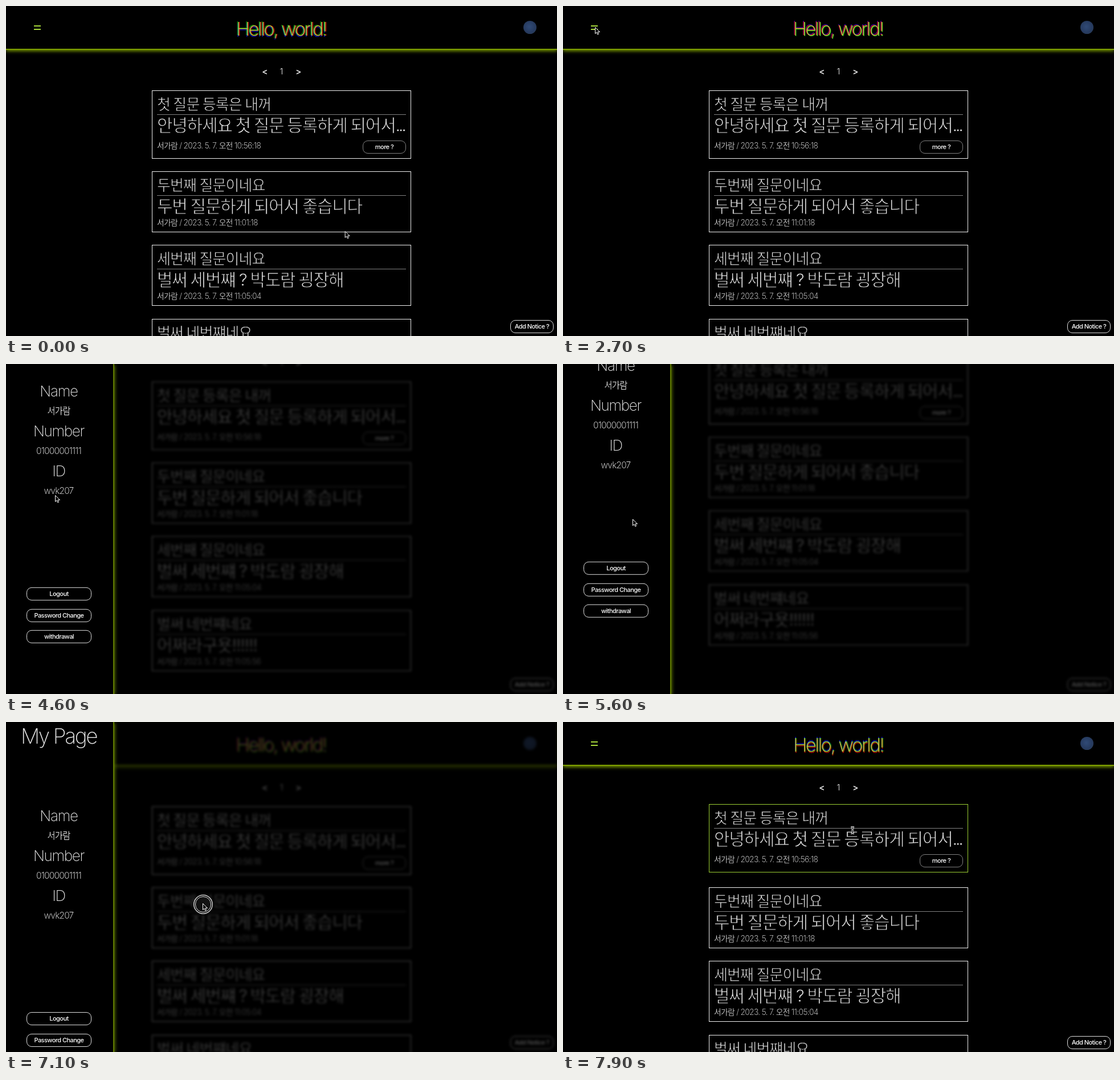
An HTML page for the animation above (8 s loop, 967x579 px).

```html
<!DOCTYPE html>
<html lang="ko">
<head>
<meta charset="utf-8">
<title>Hello, world!</title>
<style>
  :root { --lime: #9acd32; --line: #7d9e00; --loop: 8s linear infinite; }
  * { box-sizing: border-box; }
  html, body { margin: 0; width: 100%; height: 100%; overflow: hidden; background: #000; }
  body {
    position: relative; color: #e4e4e4; white-space: nowrap;
    font: 300 13.8px Inter, 'Noto Sans CJK KR', 'Noto Sans CJK', sans-serif;
  }
  body * { position: absolute; letter-spacing: -.05em; }
  span span { position: static; }

  /* Page */
  .page { inset: 0; animation: dim var(--loop); }
  .scroll { inset: 0; animation: scroll var(--loop); }
  header { left: 0; top: 0; width: 967px; height: 77px; border-bottom: 2px solid var(--line); box-shadow: 0 2px 6px var(--line); }
  h1 {
    margin: 0; left: 0; width: 966px; top: 20px; text-align: center; color: #b4d94c;
    font-size: 32.5px; font-weight: 200; line-height: 41px; letter-spacing: -.066em;
    animation: glitch .5s linear -25ms infinite;
  }
  .menu { left: 49px; top: 34px; width: 12px; height: 8px; border: solid #a5d63a; border-width: 2px 0; }
  .avatar { left: 908px; top: 26px; width: 23px; height: 23px; border-radius: 50%; background: radial-gradient(circle at 45% 45%, #304a76, #263a5e 60%, #34435a); }
  .pager span { top: 105px; width: 20px; text-align: center; line-height: 20px; font-size: 15px; }
  .pager .arrow { font-weight: 600; }

  .card { left: 256px; width: 455px; height: 107px; border: 1px solid #eee; }
  .card.tall { height: 120px; }
  .card span { left: 8px; }
  .title, .text { font-weight: 400; -webkit-text-stroke: .028em #000; word-spacing: -.04em; }
  .title { top: 8px; font-size: 26px; line-height: 32px; letter-spacing: -.035em; }
  .text { top: 41px; font-size: 30px; line-height: 38px; letter-spacing: -.043em; }
  .dots { letter-spacing: -.11em; }
  .date { top: 79px; line-height: 20px; -webkit-text-stroke: .015em #000; }
  .tall .date { top: 86px; }
  .card hr { margin: 0; left: 8px; top: 41px; width: 437px; height: 1px; border: 0; background: #808080; }

  .btn {
    height: 23px; border: 1px solid #ddd; border-radius: 9px; background: #000; color: #fff;
    font-size: 11px; font-weight: 500; line-height: 21px; text-align: center;
  }
  .card .more { left: 369px; top: 87px; width: 76px; border-color: #808080; }
  .notice { left: 885px; top: 551px; width: 76px; }
  .first { animation: first var(--loop); }
  .second { animation: second var(--loop); }

  /* Sidebar */
  aside {
    left: 0; top: 0; width: 190px; height: 579px; overflow: hidden; background: #000;
    border-right: 2px solid #5f7a00; box-shadow: 1px 2px 6px #5f7a00;
    animation: slide var(--loop);
  }
  aside span { left: 0; width: 185px; text-align: center; line-height: 40px; font-size: 15.4px; -webkit-text-stroke: .012em #000; }
  aside .big, aside .label { font-weight: 200; -webkit-text-stroke: 0; }
  aside .big { font-size: 37px; letter-spacing: -.065em; }
  aside .label { font-size: 26px; }
  aside .btn { left: 36px; width: 114px; }

  /* Pointer */
  .pointer { left: 0; top: 0; width: 1px; height: 1px; overflow: visible; animation: move var(--loop); }
  .arrow-shape { animation: arrow 8s step-end infinite; }
  .beam { animation: beam 8s step-end infinite; }
  .ring { animation: ring 8s step-end infinite; }

  @keyframes glitch {
    0%, 14% { text-shadow: .05em 0 0 #ff0000bf, -.05em -.025em 0 #00ff0080, -.025em .05em 0 #0000ffbf; }
    15%, 49% { text-shadow: -.05em -.025em 0 #ff0000bf, .025em .025em 0 #00ff0080, -.05em -.05em 0 #0000ffbf; }
    50%, 99% { text-shadow: .025em .05em 0 #ff0000bf, .05em 0 0 #00ff0080, 0 -.05em 0 #0000ffbf; }
    100% { text-shadow: -.025em 0 0 #ff0000bf, -.025em -.025em 0 #00ff0080, -.025em -.05em 0 #0000ffbf; }
  }
  @keyframes dim {
    0%, 37.5%, 95.6%, 100% { filter: blur(0) brightness(1); }
    42%, 90% { filter: blur(2px) brightness(.34); }
  }
  @keyframes slide {
    0%, 36.5% { transform: translateX(-205px); animation-timing-function: ease; }
    42.75% { transform: none; }
    90% { transform: none; animation-timing-function: ease; }
    95.6%, 100% { transform: translateX(-205px); }
  }
  @keyframes scroll {
    0%, 51.25% { transform: none; }
    57.5% { transform: translateY(-117px); }
    61.25%, 70% { transform: translateY(-163px); }
    71.25% { transform: translateY(-84px); }
    72.5%, 100% { transform: none; }
  }
  @keyframes first {
    0%, 96.25% { transform: none; border-color: #eee; }
    98.5%, 100% { transform: translateY(-4px); border-color: var(--lime); }
  }
  @keyframes second {
    0%, 93.75%, 97.5%, 100% { transform: none; border-color: #eee; }
    95.5%, 96.25% { transform: translateY(-4px); border-color: var(--lime); }
  }
  @keyframes move {
    0% { transform: translate(595px, 395px); }
    3.75% { transform: translate(480px, 330px); }
    6.25% { transform: translate(250px, 140px); }
    10%, 12.5% { transform: translate(119px, 53px); }
    13.75%, 16.25% { transform: translate(128px, 52px); }
    20% { transform: translate(159px, 52px); }
    22.5% { transform: translate(145px, 50px); }
    26.25% { transform: translate(62px, 41px); }
    30%, 37.5% { transform: translate(56px, 37px); }
    42.5%, 51.25% { transform: translate(60px, 40px); }
    57.5% { transform: translate(86px, 230px); }
    70%, 73.75% { transform: translate(122px, 272px); }
    78.75% { transform: translate(220px, 420px); }
    81.25% { transform: translate(270px, 488px); }
    86.25%, 93.75% { transform: translate(345px, 318px); }
    98.75% { transform: translate(508px, 190px); }
    100% { transform: translate(520px, 182px); }
  }
  @keyframes arrow { 0%, 51% { opacity: 1; } 39.5%, 96.5%, 100% { opacity: 0; } }
  @keyframes beam { 0%, 51% { opacity: 0; } 39.5%, 96.5%, 100% { opacity: 1; } }
  @keyframes ring { 0%, 36.5%, 90.5%, 100% { opacity: 0; } 34.5%, 87.5% { opacity: 1; } }
</style>
</head>
<body>
  <div class="page">
    <div class="scroll">
      <header>
        <i class="menu"></i>
        <h1>Hello, world!</h1>
        <i class="avatar"></i>
      </header>
      <nav class="pager">
        <span class="arrow" style="left:444px">&lt;</span>
        <span style="left:473px">1</span>
        <span class="arrow" style="left:503px">&gt;</span>
      </nav>
      <section class="card tall first" style="top:148px">
        <span class="title">첫 질문 등록은 내꺼</span><hr>
        <span class="text">안녕하세요 첫 질문 등록하게 되어서<span class="dots">...</span></span>
        <span class="date">서가람 / 2023. 5. 7. 오전 10:56:18</span>
        <div class="btn more">more ?</div>
      </section>
      <section class="card second" style="top:290px">
        <span class="title">두번째 질문이네요</span><hr>
        <span class="text">두번 질문하게 되어서 좋습니다</span>
        <span class="date">서가람 / 2023. 5. 7. 오전 11:01:18</span>
      </section>
      <section class="card" style="top:419px">
        <span class="title">세번째 질문이네요</span><hr>
        <span class="text">벌써 세번쨰 ? 박도람 굉장해</span>
        <span class="date">서가람 / 2023. 5. 7. 오전 11:05:04</span>
      </section>
      <section class="card" style="top:549px">
        <span class="title">벌써 네번쨰네요</span><hr>
        <span class="text">어쩌라구욧!!!!!!</span>
        <span class="date">서가람 / 2023. 5. 7. 오전 11:05:56</span>
      </section>
    </div>
    <div class="btn notice">Add Notice ?</div>
  </div>

  <aside>
    <div class="scroll">
      <span class="big" style="top:5px">My Page</span>
      <span class="label" style="top:145px">Name</span>
      <span style="top:180px">서가람</span>
      <span class="label" style="top:215px">Number</span>
      <span style="top:250px">01000001111</span>
      <span class="label" style="top:285px">ID</span>
      <span style="top:320px">wvk207</span>
      <div class="btn" style="top:509px">Logout</div>
      <div class="btn" style="top:547px">Password Change</div>
      <div class="btn" style="top:584px">withdrawal</div>
    </div>
  </aside>

  <svg class="pointer">
    <g class="ring" fill="none" stroke="#ddd">
      <circle cx="1" cy="2" r="16.3" fill="#141414cc" stroke-width="1.3"/>
      <circle cx="1" cy="2" r="13.6"/>
    </g>
    <path class="arrow-shape" d="M.5 .5V11.5L3 9.2L4.8 13L6.6 12.2L4.9 8.5H8.5Z" fill="#000" stroke="#fff" stroke-linejoin="round"/>
    <g class="beam" fill="none">
      <path id="ibeam" d="M-3 -5.5Q0 -5.5 0 -3V3Q0 5.5 -3 5.5M3 -5.5Q0 -5.5 0 -3M0 3Q0 5.5 3 5.5M-2 1.5H2" stroke-width="3" stroke="#fff"/>
      <path d="M-3 -5.5Q0 -5.5 0 -3V3Q0 5.5 -3 5.5M3 -5.5Q0 -5.5 0 -3M0 3Q0 5.5 3 5.5M-2 1.5H2" stroke="#000"/>
    </g>
  </svg>
</body>
</html>
```
